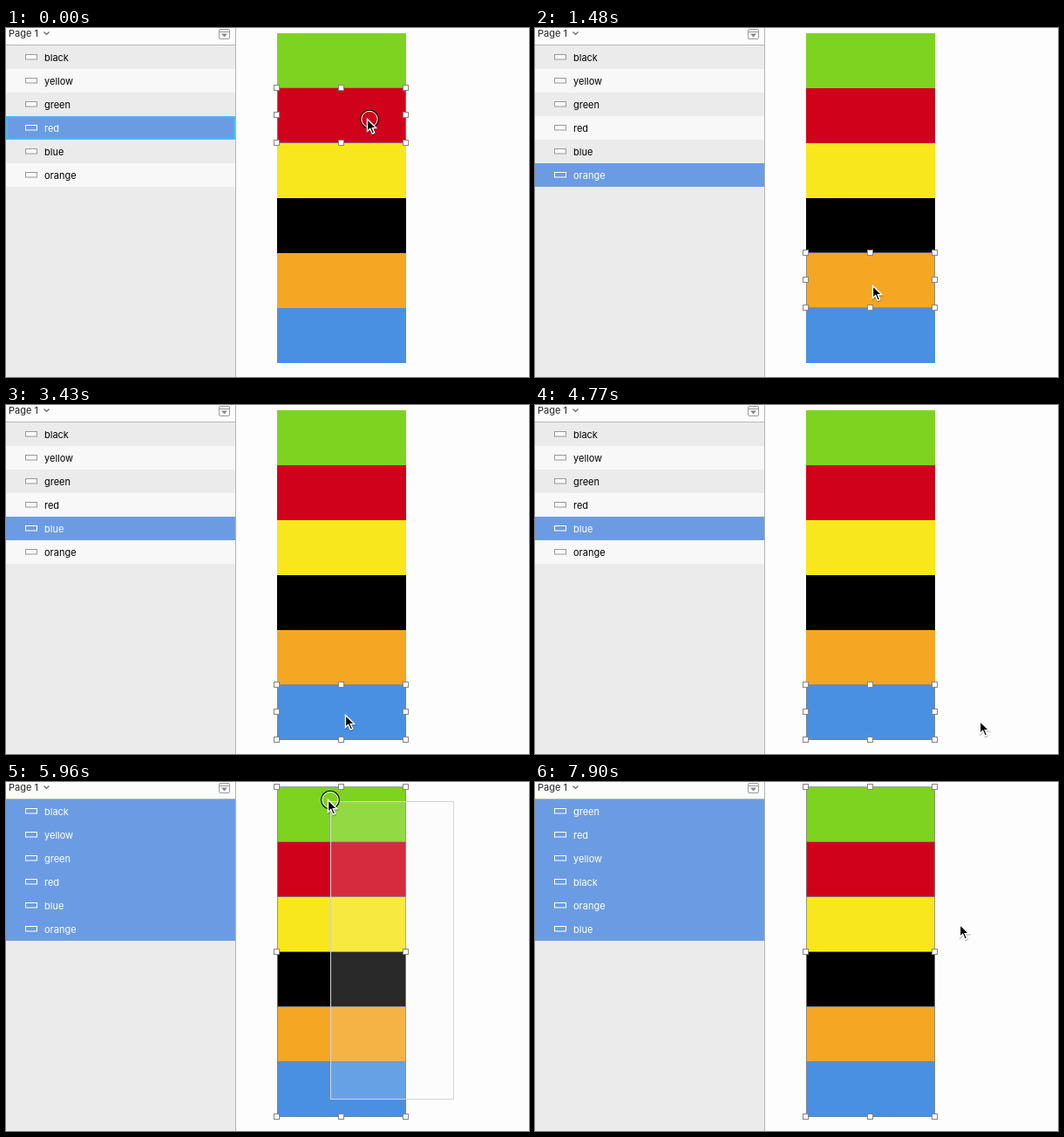
These frames come from a looping animation (600x400 px, 8000 ms). An HTML page:

```html
<!DOCTYPE html>
<html lang="en">
<head>
<meta charset="utf-8">
<title>Layer order</title>
<style>
  html, body { margin: 0; width: 100%; height: 100%; overflow: hidden; background: #fdfdfd; }
  svg { display: block; width: 100%; height: 100%; }
  text { font: 11px Inter, "Open Sans", sans-serif; }
</style>
</head>
<body>
<svg id="stage" viewBox="0 0 600 400"></svg>
<script>
const LOOP = 8000, TICK = 149, LEAD = 11;
const LEFT = 311, RIGHT = 459, TOP = 6, LAYER_H = 63, ROW_TOP = 20, ROW_H = 27;
const SELECTED = '#6b9ce3', HOVER = '#4ab8f5';

// Layers from top to bottom on the canvas
const colors = {
  green: '#7ed321', red: '#d0021b', yellow: '#f8e71c',
  black: '#000', orange: '#f5a623', blue: '#4a90e2'
};
const names = Object.keys(colors);
const mixed = ['black', 'yellow', 'green', 'red', 'blue', 'orange'];

const clicks = { 0: 'red', 3: 'yellow', 6: 'black', 9: 'orange', 12: 'blue' };
const drag = { start: 33, move: 35, end: 43, x: 513.5, y: 363.5 };
const SORTED_AT = 52;

// Pointer stops: tick, x, y
const stops = [
  [0, 414, 104], [2, 409, 136], [3, 402, 160], [5, 392, 207], [6, 390, 221],
  [8, 388, 285], [9, 387, 295], [11, 386, 335], [12, 385, 355],
  [23, 389, 355], [24, 393, 355],
  [28, 402, 356], [29, 432, 358], [30, 468, 360], [31, 496, 362], [32, 510, 362],
  [35, 490, 320], [36, 448, 248], [37, 424, 141], [38, 395, 78], [39, 378, 40],
  [40, 369, 20], [41, 366, 15],
  [47, 384, 42], [48, 450, 118], [49, 485, 163], [52, 486, 163], [53, 487, 163]
];

const el = (parent, tag, attrs = {}) => {
  const node = document.createElementNS('http://www.w3.org/2000/svg', tag);
  set(node, attrs);
  return parent.appendChild(node);
};
const set = (node, attrs) => {
  for (const key in attrs) node.setAttribute(key, attrs[key]);
};
const show = (node, on) => set(node, { display: on ? 'inline' : 'none' });
const box = (x, y, width, height) => ({ x, y, width, height });
const layerTop = i => TOP + i * LAYER_H;

const stage = document.getElementById('stage');
el(stage, 'rect', { ...box(0, 0, 600, 400), fill: '#fdfdfd' });

// Sidebar
el(stage, 'rect', { ...box(0, 0, 263, 400), fill: '#ebebeb' });
el(stage, 'rect', { ...box(0, 0, 263, 19), fill: '#fcfcfc' });
el(stage, 'rect', { ...box(0, 19, 263, 1), fill: '#b8b8b8' });
el(stage, 'text', { x: 3, y: 10, fill: '#222' }).textContent = 'Page 1';
el(stage, 'path', { d: 'M43.5 4.5l3 3 3-3', fill: 'none', stroke: '#666', 'stroke-width': 1.2 });
el(stage, 'rect', { ...box(244.5, 1.5, 12, 11), rx: 1.5, fill: '#fff', stroke: '#999' });
el(stage, 'path', { d: 'M245 4.5h11', stroke: '#999' });
el(stage, 'path', { d: 'M247 6.5h7l-3.5 4z', fill: '#888' });

const rows = mixed.map((_, i) => {
  const y = ROW_TOP + i * ROW_H;
  return {
    base: i % 2 ? '#f8f8f8' : '#ebebeb',
    back: el(stage, 'rect', box(0, y, 263, ROW_H)),
    icon: el(stage, 'rect', box(22.5, y + 10.5, 13, 5.5)),
    label: el(stage, 'text', { x: 44, y: y + 18 }),
    ring: el(stage, 'rect', {
      ...box(1, y + 1, 261, ROW_H - 2), fill: 'none', stroke: HOVER, 'stroke-width': 2
    })
  };
});
el(stage, 'rect', { ...box(263, 0, 1, 400), fill: '#b4b4b4' });

// Canvas
names.forEach((name, i) =>
  el(stage, 'rect', { ...box(LEFT, layerTop(i), RIGHT - LEFT, LAYER_H), fill: colors[name] }));
const outlines = names.map((_, i) => el(stage, 'rect', {
  ...box(LEFT + .5, layerTop(i) - .5, RIGHT - LEFT - 1, LAYER_H),
  fill: 'none', stroke: '#808080', 'stroke-opacity': .75
}));
const hoverBox = el(stage, 'rect', {
  ...box(LEFT, 0, RIGHT - LEFT, LAYER_H), fill: 'none', stroke: HOVER, 'stroke-width': 2
});
const marquee = el(stage, 'rect', { fill: 'rgba(240,240,240,.17)', stroke: '#d4d4d4' });
const handles = Array.from({ length: 8 }, () =>
  el(stage, 'rect', { width: 6, height: 6, fill: '#fff', stroke: '#858585' }));

// Pointer
const pointer = el(stage, 'g');
const press = el(pointer, 'g', { fill: 'none' });
el(press, 'circle', { cx: 3, cy: .5, r: 10.2, stroke: '#000', 'stroke-width': 1.2 });
el(press, 'circle', { cx: 3, cy: .5, r: 9.2, stroke: '#fff' });
const arrow = 'M.5 .5V14.5L3.7 11.5 6.2 17.2 8.7 16.1 6.3 10.6H10.6Z';
el(pointer, 'path', { d: arrow, transform: 'translate(.5 1.2)', stroke: '#000', 'stroke-width': 2, opacity: .2 });
el(pointer, 'path', { d: arrow, stroke: '#fff', 'stroke-width': 1.4 });

function pointerAt(tick) {
  const [, x, y] = stops.findLast(stop => stop[0] <= tick);
  return { x, y };
}

// The dragged corner trails the pointer slightly
function cornerAt(tick) {
  const now = pointerAt(tick), before = pointerAt(tick - 1);
  const trail = axis => now[axis] + (before[axis] - now[axis]) * .07;
  return { x: Math.floor(trail('x') + 3) + .5, y: Math.floor(trail('y') + 1) + .5 };
}

function selectionAt(tick) {
  if (tick < drag.start) {
    const last = Math.max(...Object.keys(clicks).filter(k => k <= tick));
    return [clicks[last]];
  }
  const corner = cornerAt(Math.min(tick, drag.end - 1));
  return corner.x < RIGHT ? names.filter((_, i) => layerTop(i + 1) > corner.y) : [];
}

function hoverAt(tick, { x, y }, selected) {
  if (tick >= drag.start || x < LEFT || x > RIGHT) return null;
  const name = names[Math.floor((y - TOP) / LAYER_H)];
  return clicks[tick] || !selected.includes(name) ? name : null;
}

function drawRows(tick, selected, hover) {
  const order = tick < SORTED_AT ? mixed : names;
  rows.forEach((row, i) => {
    const name = order[i], on = selected.includes(name);
    set(row.back, { fill: on ? SELECTED : row.base });
    set(row.icon, { fill: on ? 'none' : '#fafafa', stroke: on ? '#fff' : '#999' });
    set(row.label, { fill: on ? '#fff' : '#000' });
    if (row.label.textContent !== name) row.label.textContent = name;
    show(row.ring, name === hover);
  });
}

function drawSelection(selected) {
  outlines.forEach((line, i) => show(line, selected.includes(names[i])));
  const first = layerTop(names.indexOf(selected[0]));
  const half = selected.length * LAYER_H / 2;
  handles.forEach((handle, i) => {
    show(handle, selected.length > 0);
    if (!selected.length) return;
    const cell = i < 4 ? i : i + 1;
    const x = LEFT + (cell % 3) * (RIGHT - LEFT) / 2;
    const y = Math.floor(first + Math.floor(cell / 3) * half);
    set(handle, { x: x - 3.5, y: y - 3.5 });
  });
}

function draw(time) {
  const tick = Math.floor((time % LOOP + LEAD) / TICK);
  const at = pointerAt(tick);
  const selected = selectionAt(tick);
  const hover = hoverAt(tick, at, selected);
  const dragging = tick >= drag.start && tick < drag.end;

  drawRows(tick, selected, hover);
  drawSelection(selected);

  const hot = hover && !selected.includes(hover);
  show(hoverBox, hot);
  if (hot) set(hoverBox, { y: layerTop(names.indexOf(hover)) });

  const sweeping = dragging && tick >= drag.move;
  show(marquee, sweeping);
  if (sweeping) {
    const corner = cornerAt(tick);
    set(marquee, box(corner.x, corner.y, drag.x - corner.x, drag.y - corner.y));
  }

  set(pointer, { transform: `translate(${at.x} ${at.y})` });
  show(press, dragging || tick in clicks);
}

const start = performance.now();
function frame() {
  draw(performance.now() - start);
  requestAnimationFrame(frame);
}
frame();
</script>
</body>
</html>
```
